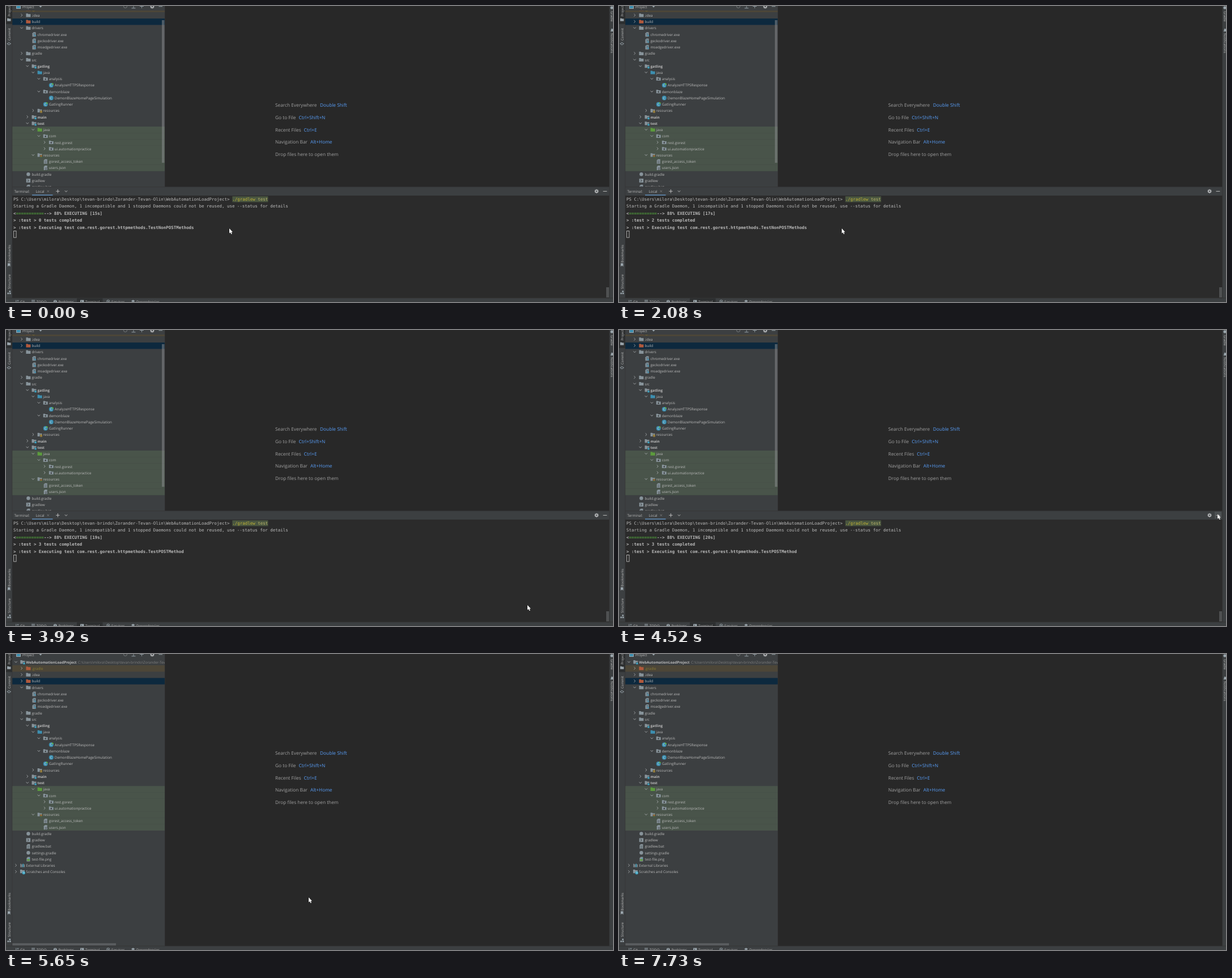
An HTML page with a canvas for the animation above (8 s loop, 1071 px wide and 523 px high).

```html
<!DOCTYPE html>
<html lang="en">
<head>
<meta charset="utf-8">
<title>IDE test run</title>
<style>
html, body { margin: 0; width: 100%; height: 100%; overflow: hidden; background: #282828; }
canvas { display: block; }
</style>
</head>
<body>
<canvas id="stage" width="1071" height="523"></canvas>
<script>
const ctx = document.getElementById('stage').getContext('2d');
ctx.textRendering = 'geometricPrecision';

const LOOP = 8000, CLOSE_AT = 4830, HOVER_AT = 4400;
const ROW = 11.23, SCROLL = 20.25;
const UI = '"Open Sans", "Noto Sans", sans-serif';
const MONO = '"DejaVu Sans Mono", "Noto Sans Mono", monospace';
const C = {
  panel: '#3c3f41', editor: '#282828', term: '#2b2b2b', line: '#323232', text: '#bbbbbb',
  icon: '#9aa5ac', folder: '#87939a', blue: '#3d8fb0', cyan: '#40a6c4', green: '#5c9c3d',
  orange: '#b0593c', yellow: '#c9a13b', pressed: '#2d2f30', dim: '#808080'
};

function rect(x, y, w, h, color) {
  ctx.fillStyle = color;
  ctx.fillRect(x, y, w, h);
}
function text(s, x, y, color = C.text, size = 6.32, weight = '', family = UI) {
  ctx.font = `${weight} ${size}px ${family}`;
  ctx.fillStyle = color;
  ctx.fillText(s, x, y);
}
function path(points, color, width = 0, close = false) {
  ctx.beginPath();
  points.forEach(([x, y], i) => i ? ctx.lineTo(x, y) : ctx.moveTo(x, y));
  if (close || !width) ctx.closePath();
  if (width) {
    ctx.lineWidth = width;
    ctx.strokeStyle = color;
    ctx.stroke();
  } else {
    ctx.fillStyle = color;
    ctx.fill();
  }
}
function disc(x, y, r, color, width = 0) {
  ctx.beginPath();
  ctx.arc(x, y, r, 0, Math.PI * 2);
  ctx.fillStyle = ctx.strokeStyle = color;
  ctx.lineWidth = width;
  width ? ctx.stroke() : ctx.fill();
}
function clipped(x, y, w, h, draw) {
  ctx.save();
  ctx.beginPath();
  ctx.rect(x, y, w, h);
  ctx.clip();
  draw();
  ctx.restore();
}
function sideText(s, x, y, angle) {
  ctx.save();
  ctx.translate(x, y);
  ctx.rotate(angle);
  text(s, 0, 0, C.text, 6);
  ctx.restore();
}
function chevron(x, y, open, color = '#a5a9ab') {
  const tips = open ? [[-2.2, -1.2], [0, 1.2], [2.2, -1.2]] : [[-1.2, -2.3], [1.2, 0], [-1.2, 2.3]];
  path(tips.map(([a, b]) => [x + a, y + b]), color, 0.9);
}
function gear(x, y) {
  for (let i = 0; i < 4; i++) {
    const a = i * Math.PI / 4, dx = Math.cos(a) * 3.6, dy = Math.sin(a) * 3.6;
    path([[x - dx, y - dy], [x + dx, y + dy]], '#afb1b3', 1.4);
  }
  disc(x, y, 2.1, '#afb1b3', 1.5);
  disc(x, y, 1.1, C.panel);
}

// Tree icons, centred on x, y
function folder(x, y, color = C.folder) {
  path([[x - 4, y - 3.2], [x - 1, y - 3.2], [x, y - 2.2], [x + 4, y - 2.2], [x + 4, y + 3], [x - 4, y + 3]], color);
}
function sheet(x, y) {
  path([[x - 1, y - 4], [x + 3, y - 4], [x + 3, y + 4], [x - 3, y + 4], [x - 3, y - 2]], C.folder);
}
function bars(x, y, colors) {
  rect(x, y - 0.4, 4.6, 4.4, C.panel);
  colors.forEach((c, i) => rect(x + 0.5, y + i * 1.4, 3.8, 0.9, c));
}
const icons = {
  folder,
  build: (x, y) => folder(x, y, C.orange),
  source: (x, y) => folder(x, y, C.blue),
  tests: (x, y) => folder(x, y, C.green),
  module(x, y) { folder(x, y); rect(x + 0.4, y + 0.2, 4, 4, C.panel); rect(x + 1, y + 0.8, 3.2, 3.2, C.cyan); },
  pack(x, y) { folder(x, y); disc(x, y + 0.5, 1.3, C.panel); },
  res(x, y) { folder(x, y); bars(x, y, [C.yellow, C.yellow, C.yellow]); },
  testRes(x, y) { folder(x, y); bars(x, y, [C.yellow, C.orange, C.green]); },
  exe(x, y) { sheet(x, y); text('?', x - 1.5, y + 2.5, '#28607a', 6.5, 'bold'); disc(x + 2.2, y + 2, 1.3, C.blue); },
  file(x, y) { sheet(x, y); for (let i = -1; i < 3; i++) rect(x - 1.8, y + i * 1.5, 3.6, 0.6, '#50585c'); },
  json(x, y) { sheet(x, y); rect(x - 0.6, y - 0.4, 4.4, 4.4, '#50585c'); disc(x + 1.6, y + 1.8, 1.3, '#a7b0b5', 0.7); },
  image(x, y) { sheet(x, y); rect(x - 2.2, y, 4.4, 3, C.green); disc(x + 1.6, y - 1.2, 0.9, C.cyan); },
  klass(x, y) { disc(x, y, 4, C.blue); text('C', x - 2, y + 2.2, '#d3e4ea', 6); },
  runnable(x, y) { icons.klass(x, y); path([[x + 1.4, y - 4], [x + 4.6, y - 2.2], [x + 1.4, y - 0.4]], '#62b543'); },
  mark: (x, y) => disc(x, y, 3.2, C.folder),
  shell(x, y) { rect(x - 3.7, y - 3.4, 7.4, 6.8, C.folder); path([[x - 1.6, y - 2], [x + 0.8, y], [x - 1.6, y + 2]], C.panel, 1); },
  library(x, y) { for (let i = 0; i < 4; i++) rect(x - 4 + i * 2.1, y - 3 + i % 2, 1.5, 6 - i % 2, i === 2 ? C.cyan : C.folder); },
  scratch(x, y) { folder(x - 0.4, y - 0.6); disc(x + 2, y + 1.8, 2.7, C.cyan); path([[x + 2, y + 0.3], [x + 2, y + 2], [x + 3.2, y + 2]], '#fff', 0.6); }
};

// level, chevron (+ open, - closed, . none), icon, label
const tree = [
  [0, '+', 'module', 'WebAutomationLoadProject', 'bold'],
  [1, '-', 'build', '.gradle'], [1, '-', 'folder', '.idea'], [1, '-', 'build', 'build'],
  [1, '+', 'folder', 'drivers'],
  [2, '.', 'exe', 'chromedriver.exe'], [2, '.', 'exe', 'geckodriver.exe'], [2, '.', 'exe', 'msedgedriver.exe'],
  [1, '-', 'folder', 'gradle'], [1, '+', 'folder', 'src'],
  [2, '+', 'module', 'gatling', 'bold'], [3, '+', 'source', 'java'],
  [4, '+', 'pack', 'analysis'], [5, '.', 'runnable', 'AnalyzeHTTPSResponse'],
  [4, '+', 'pack', 'demonblaze'], [5, '.', 'klass', 'DemonBlazeHomePageSimulation'],
  [4, '.', 'runnable', 'GatlingRunner'], [3, '-', 'res', 'resources'],
  [2, '-', 'module', 'main', 'bold'], [2, '+', 'module', 'test', 'bold'],
  [3, '+', 'tests', 'java'], [4, '+', 'pack', 'com'],
  [5, '-', 'pack', 'rest.gorest'], [5, '-', 'pack', 'ui.automationpractice'],
  [3, '+', 'testRes', 'resources'], [4, '.', 'file', 'gorest_access_token'], [4, '.', 'json', 'users.json'],
  [1, '.', 'mark', 'build.gradle'], [1, '.', 'shell', 'gradlew'], [1, '.', 'file', 'gradlew.bat'],
  [1, '.', 'mark', 'settings.gradle'], [1, '.', 'image', 'test-file.png'],
  [0, '-', 'library', 'External Libraries'], [0, '-', 'scratch', 'Scratches and Consoles']
];
const rowColor = i => i === 1 ? '#4c4638' : i === 3 ? '#0d293e' : i >= 20 && i <= 26 ? '#49544a' : null;

function drawTree(scroll) {
  tree.forEach(([level, fold, icon, label, weight], i) => {
    const y = 14.3 + i * ROW - scroll, x = level * 10.1, back = rowColor(i);
    if (back) rect(11, y - ROW / 2, 269, ROW + 0.1, back);
    if (fold !== '.') chevron(17.5 + x, y - 0.3, fold === '+');
    icons[icon](29.3 + x, y);
    text(label, 35.3 + x, y + 2.4, i === 1 ? '#8a7b32' : C.text, 6.32, weight);
    if (!i) text('C:\\Users\\milora\\Desktop\\tevan-brindo\\Zorander-Tevan-Olin', 127, y + 2.4, C.dim);
  });
}

function drawProject(terminalOpen) {
  rect(11, 0, 269, 516, C.panel);
  clipped(11, 8, 269, (terminalOpen ? 320 : 516) - 8, () => drawTree(terminalOpen ? SCROLL : 0));
  if (terminalOpen) rect(275, 25, 4.5, 252, 'rgba(140,142,143,.5)');
  else rect(11, 511, 183, 4, '#595c5e');
  rect(18, -2, 8, 7, C.icon);
  rect(19, 0, 6, 4, C.blue);
  text('Project', 29, 3.8);
  path([[58.5, 0], [63.5, 0], [61, 2.8]], C.icon);
  disc(210.5, 0.5, 3, '#7c8083', 0.9);
  for (const x of [225, 239.5]) {
    rect(x - 3.5, x < 230 ? 3.4 : 0, 7, 0.9, C.icon);
    path([[x, -3], [x, 4]], C.icon, 0.8);
  }
  gear(258, 1);
  rect(269.5, 0.3, 6.5, 1, C.icon);
  rect(280, 0, 0.7, 516, C.line);
}

function drawEditor() {
  rect(280, 0, 785, 516, C.editor);
  [
    ['Search Everywhere', 'Double Shift', 554], ['Go to File', 'Ctrl+Shift+N', 516.5],
    ['Recent Files', 'Ctrl+E', 525.5], ['Navigation Bar', 'Alt+Home', 537],
    ['Drop files here to open them', '', 0]
  ].forEach(([label, keys, x], i) => {
    const y = 177.8 + i * 21.88;
    text(label, 475, y, '#a0a0a0', 8.3);
    text(keys, x, y, '#589df6', 8.3);
  });
}

const count = (times, t) => times.filter(at => t >= at).length;

function drawTerminal(t) {
  rect(11, 319.5, 1054, 15.5, C.panel);
  rect(11, 319.5, 1054, 0.7, C.line);
  text('Terminal:', 14.5, 329.8);
  text('Local', 52.5, 329.8);
  path([[72.5, 325.6], [76, 329.1]], C.dim, 0.8);
  path([[76, 325.6], [72.5, 329.1]], C.dim, 0.8);
  rect(46, 333.2, 36.5, 1.8, '#5b83a8');
  rect(88.2, 326.8, 6.4, 1, C.text);
  rect(90.9, 324, 1, 6.6, C.text);
  chevron(106, 327.3, true, C.text);
  gear(1042, 327.3);
  if (t >= HOVER_AT) rect(1051, 321, 12, 12, '#4c5052');
  rect(1053.5, 326.9, 6.8, 1, C.text);

  rect(11, 335, 1054, 181, C.term);
  rect(1059, 497, 5, 18, '#4f5152');
  const col = n => 13 + n * 4.492;
  const put = (s, n, row, color = C.text, weight = '') =>
    text(s, col(n), 344.1 + row * 12.35, color, 7.46, weight, MONO);
  const bold = (s, n, row, color) => put(s, n, row, color, 'bold');

  rect(399.4, 336.3, 63, 10.2, '#4a5640');
  put('PS C:\\Users\\milora\\Desktop\\tevan-brindo\\Zorander-Tevan-Olin\\WebAutomationLoadProject>', 0, 0);
  put('./gradlew', 86, 0, '#c0b436');
  put('test', 96, 0, '#b9b56a');
  put('Starting a Gradle Daemon, 1 incompatible and 1 stopped Daemons could not be reused, use --status for details', 0, 1);

  const seconds = 15 + count([370, 1300, 2360, 3320, 4400], t);
  const done = count([930, 2080, 3560], t);
  bold('<', 0, 2);
  bold('='.repeat(11), 1, 2, '#4f9a3c');
  bold(`--> 88% EXECUTING [${seconds}s]`, 12, 2);
  bold(`> :test > ${done} test${done === 1 ? '' : 's'} completed`, 0, 3);
  bold(`> :test > Executing test com.rest.gorest.httpmethods.${done < 3 ? 'TestNonPOSTMethods' : 'TestPOSTMethod'}`, 0, 4);
  ctx.strokeStyle = C.text;
  ctx.lineWidth = 0.9;
  ctx.strokeRect(13.6, 397.5, 4.4, 11.6);
}

function drawStripes(terminalOpen) {
  rect(0, 0, 11, 523, C.panel);
  rect(0, 0, 11, 32, C.pressed);
  rect(10.6, 0, 0.6, 516, C.line);
  const up = -Math.PI / 2;
  sideText('Project', 7.7, 18.5, up);
  sideText('Commit', 7.7, 61, up);
  sideText('Bookmarks', 7.7, 453.5, up);
  sideText('Structure', 7.7, 500, up);
  ctx.save();
  ctx.translate(5.3, 24.3);
  ctx.scale(0.8, 0.8);
  folder(0, 0, C.icon);
  ctx.restore();
  rect(1.5, 66.2, 7.4, 0.9, C.icon);
  disc(5.2, 66.6, 2, C.panel);
  disc(5.2, 66.6, 2, C.icon, 0.9);
  path([[3, 454.5], [7.5, 454.5], [7.5, 460.5], [5.25, 458.5], [3, 460.5]], C.icon);
  rect(5.5, 503, 2.6, 2.6, C.icon);
  rect(2.5, 506.5, 2.6, 2.6, C.icon);
  rect(6, 506.5, 2.6, 2.6, C.icon);

  rect(1064.5, 0, 6.5, 523, C.panel);
  rect(1064.5, 0, 0.6, 516, C.line);
  disc(1069, 3, 2.6, C.icon);
  sideText('Gradle', 1066.6, 9, -up);
  path([[1066.5, 45], [1067.6, 43], [1067.6, 41], [1069.2, 39.8], [1071, 41], [1071, 45]], C.icon);
  sideText('Notifications', 1066.6, 48, -up);

  rect(0, 516, 1071, 7, C.panel);
  rect(0, 515.6, 1071, 0.8, C.line);
  if (terminalOpen) rect(125, 516.4, 45.5, 7, C.pressed);
  [['Git', 25], ['TODO', 54], ['Problems', 92.5], ['Terminal', 140], ['Services', 186], ['Dependencies', 230]]
    .forEach(([label, x]) => text(label, x, 525, C.text, 6.2));
  path([[17.8, 519.5], [17.8, 523]], C.icon, 0.9);
  disc(21, 520.7, 0.9, C.icon, 0.8);
  for (const y of [519.5, 521.4]) rect(45, y, 6, 0.9, C.icon);
  disc(86.8, 522.4, 3, C.icon);
  rect(86.3, 520.6, 1, 2, C.panel);
  rect(131, 519.5, 6.5, 5, C.icon);
  path([[132.5, 520.6], [134, 522], [132.5, 523.4]], C.panel, 0.8);
  disc(180.3, 522.3, 2.8, C.icon, 0.9);
  path([[179.4, 520.8], [182, 522.3], [179.4, 523.8]], C.icon);
  path([[220.8, 521.2], [224.2, 519.3], [227.6, 521.2], [224.2, 523.2]], C.icon);
}

// The pointer is sampled in steps: time, x, y
const pointer = [
  [0, 394, 393], [930, 393.5, 393], [1050, 393, 393], [3170, 384, 392],
  [3320, 390, 388], [3440, 430, 374], [3560, 520, 356], [3680, 640, 400],
  [3800, 780, 450], [3920, 920, 486], [4040, 1014, 471], [4160, 1036, 400],
  [4280, 1052, 345], [4400, 1056, 328], [4520, 1056, 325], [4830, 1055, 326],
  [5100, 900, 378], [5220, 690, 446], [5350, 538, 442], [5650, 534, 430],
  [5770, 520, 415], [5890, 500, 407], [6010, 481, 406], [6160, 440, 404],
  [6280, 407, 422], [6430, 380, 440], [6550, 290, 490], [6670, 229, 514],
  [6820, 229, 516], [6940, 232, 519], [7090, 233, 519], [7240, 234, 519.5],
  [7490, 255, 520], [7610, 278, 520], [7730, 278, 530]
];
const arrow = [[0, 0], [0, 8.8], [2, 7], [3.5, 10.2], [4.9, 9.6], [3.6, 6.6], [6.2, 6.4]];

function drawPointer(t) {
  const [, x, y] = pointer[count(pointer.map(p => p[0]), t) - 1];
  const shape = arrow.map(([a, b]) => [x + a, y + b]);
  path(shape, '#111', 0.9, true);
  path(shape, '#fff');
}

function frame(now) {
  const t = now % LOOP, terminalOpen = t < CLOSE_AT;
  drawEditor();
  drawProject(terminalOpen);
  if (terminalOpen) drawTerminal(t);
  drawStripes(terminalOpen);
  drawPointer(t);
}

const start = performance.now();
function tick() {
  frame(performance.now() - start);
  requestAnimationFrame(tick);
}
tick();
</script>
</body>
</html>
```
